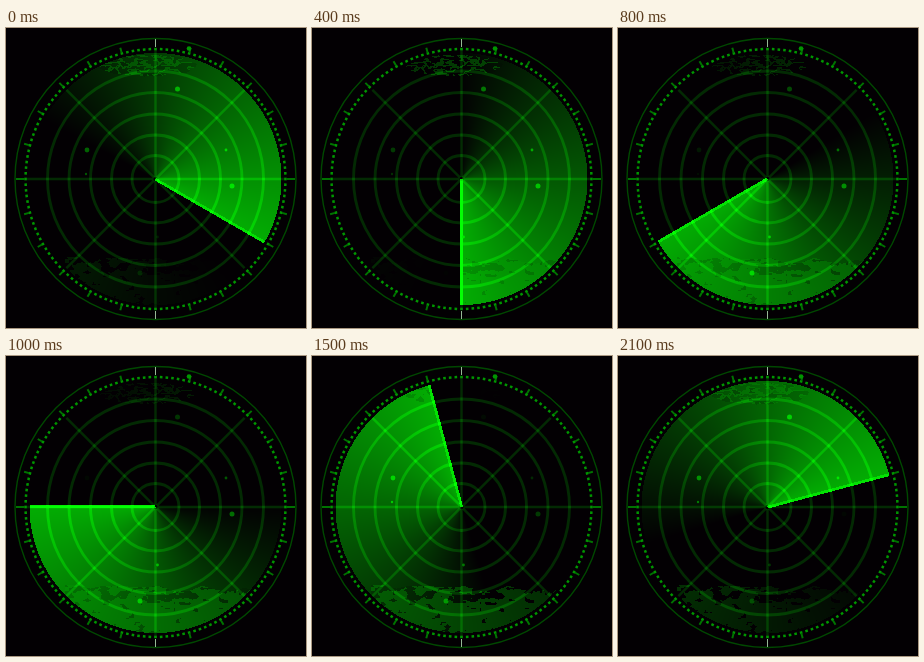
Recreate the animation shown at these times as an HTML page with a canvas. Size 300 by 300 pixels, loop 2.2 s.

```html
<!DOCTYPE html>
<html lang="en">
<head>
<meta charset="utf-8">
<title>Radar sweep</title>
<style>
html, body { margin: 0; width: 100%; height: 100%; overflow: hidden; background: #030003; }
canvas { display: block; width: 300px; height: 300px; }
</style>
</head>
<body>
<canvas id="radar" width="300" height="300"></canvas>
<script>
const SIZE = 300, CX = 149.5, CY = 151;
const SWEEP_R = 126, STEP_MS = 100, STEPS = 22;
const TAU = Math.PI * 2, DEG = Math.PI / 180;
const ctx = document.getElementById('radar').getContext('2d');

// x, y, radius
const blips = [
  [171.5, 61, 2.5], [81, 122, 2.4], [80, 146, 1.2], [220, 122, 1.4],
  [226, 158, 2.5], [134, 245, 2.5], [151.5, 209, 1.4]
];

const mod = a => ((a % 360) + 360) % 360;
const bearing = (x, y) => Math.atan2(y - CY, x - CX) / DEG;

function hash(x, y) {
  const s = Math.sin(x * 127.1 + y * 311.7) * 43758.5453;
  return s - Math.floor(s);
}

function noise(x, y) {
  const ix = Math.floor(x), iy = Math.floor(y);
  const u = x - ix, v = y - iy;
  const top = hash(ix, iy) * (1 - u) + hash(ix + 1, iy) * u;
  const low = hash(ix, iy + 1) * (1 - u) + hash(ix + 1, iy + 1) * u;
  return top * (1 - v) + low * v;
}

// 0: open, 1: land, 2: dark patch
function terrainAt(x, y) {
  const n = 0.65 * noise(x / 9, y / 4) + 0.35 * noise(x / 3 + 40, y / 2);
  const coast = 226 + 7 * noise(x / 14, 3) + Math.abs(x - 120) * 0.04;
  if (y > coast && x > 58 && x < 246) {
    const limit = y < coast + 14 ? 0.52 : 0.7;
    return n > limit ? 2 : 1;
  }
  const dx = (x - 141) / 50, dy = (y - 37) / 11;
  if (dx * dx + dy * dy < 0.6 + 0.6 * n) return n > 0.58 ? 2 : n > 0.42 ? 1 : 0;
  return 0;
}

const disc = [];
for (let y = 0; y < SIZE; y++) {
  for (let x = 0; x < SIZE; x++) {
    const dx = x + 0.5 - CX, dy = y + 0.5 - CY;
    if (Math.hypot(dx, dy) < SWEEP_R) {
      disc.push({ i: (y * SIZE + x) * 4, dx, dy, a: Math.atan2(dy, dx) / DEG, land: terrainAt(x, y) });
    }
  }
}

const image = ctx.createImageData(SIZE, SIZE);
for (let i = 0; i < image.data.length; i += 4) {
  image.data[i] = image.data[i + 2] = 3;
  image.data[i + 3] = 255;
}

function drawSweep(angle) {
  const c = Math.cos(angle * DEG), s = Math.sin(angle * DEG);
  for (const p of disc) {
    const behind = mod(angle - p.a);
    let g = 172 * Math.max(0, 1 - behind / 182);
    if (p.land === 1) g = Math.max(g, 165 * Math.max(0, 1 - behind / 340) ** 1.35);
    if (p.land === 2) g *= 0.85;
    const side = p.dx * s - p.dy * c;
    if (p.dx * c + p.dy * s > 0 && side > -1.6 && side < 1.2) g = 225;
    image.data[p.i + 1] = g;
  }
  ctx.putImageData(image, 0, 0);
}

function ring(r, width, color) {
  ctx.strokeStyle = color;
  ctx.lineWidth = width;
  ctx.beginPath();
  ctx.arc(CX, CY, r, 0, TAU);
  ctx.stroke();
}

function spoke(deg, from, to, width, color) {
  const c = Math.cos(deg * DEG), s = Math.sin(deg * DEG);
  ctx.strokeStyle = color;
  ctx.lineWidth = width;
  ctx.beginPath();
  ctx.moveTo(CX + c * from, CY + s * from);
  ctx.lineTo(CX + c * to, CY + s * to);
  ctx.stroke();
}

function dot(x, y, r, color) {
  ctx.fillStyle = color;
  ctx.beginPath();
  ctx.arc(x, y, r, 0, TAU);
  ctx.fill();
}

// Grid light adds to the sweep beneath it.
function drawGrid() {
  const line = 'rgb(0,42,0)';
  ctx.globalCompositeOperation = 'lighter';
  for (const r of [23.5, 44, 65, 86.5, 108]) ring(r, 2.8, line);
  for (let a = 0; a < 360; a += 45) spoke(a, 2, a % 90 ? 126 : 131, 2.4, line);
  ctx.globalCompositeOperation = 'source-over';
  ring(140.5, 1.4, 'rgb(0,72,0)');
}

function drawScale() {
  for (let a = 0; a < 360; a += 2.5) spoke(a, 128.7, 131.2, 2.6, 'rgb(0,150,0)');
  for (let a = 0; a < 360; a += 15) {
    if (a % 90) spoke(a, 131, 136, 2, 'rgb(0,115,0)');
  }
  for (const a of [0, 180]) spoke(a, 131, 139.5, 2, 'rgb(0,115,0)');
  for (const a of [90, 270]) spoke(a, 132, 140, 1, 'rgb(150,185,150)');
  dot(183, 20.5, 2.3, 'rgb(0,150,0)');
}

function drawBlips(angle) {
  for (const [x, y, r] of blips) {
    const behind = mod(angle - bearing(x, y));
    dot(x, y, r, `rgba(0,235,0,${(1 - behind / 360) ** 1.2})`);
  }
}

let shown = -1;
function tick() {
  const step = Math.floor(performance.now() / STEP_MS) % STEPS;
  if (step !== shown) {
    shown = step;
    const angle = 30 + step * 15;
    drawSweep(angle);
    drawGrid();
    drawScale();
    drawBlips(angle);
  }
  requestAnimationFrame(tick);
}
tick();
</script>
</body>
</html>
```
